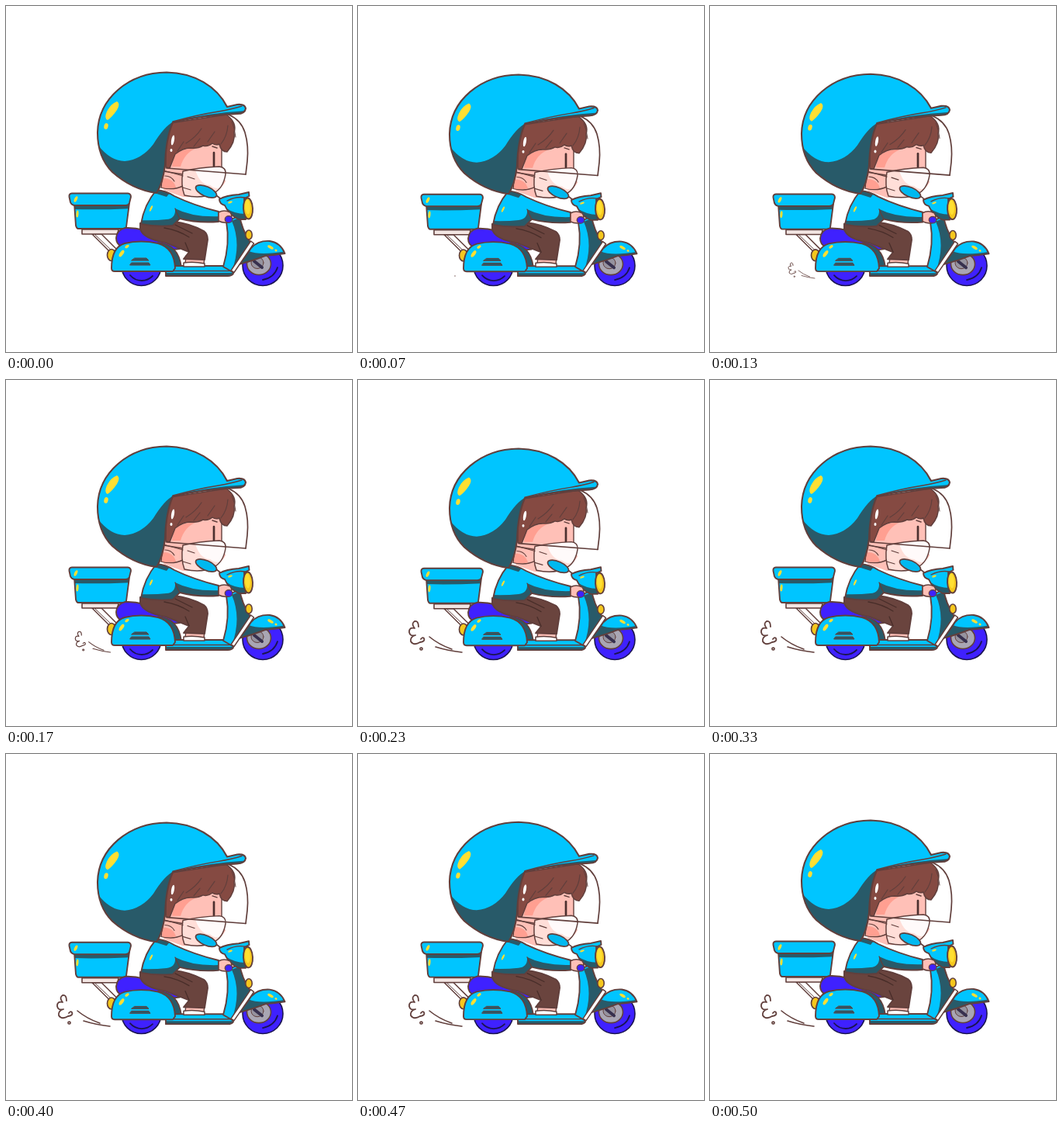
Write an HTML page with a canvas that moves like this. It is 446 px wide and 446 px high and loops after 530 ms.

```html
<!DOCTYPE html>
<html>
<head>
<meta charset="utf-8">
<style>
html, body { margin: 0; width: 446px; height: 446px; overflow: hidden; background: #fff; }
canvas { display: block; }
</style>
</head>
<body>
<canvas id="stage" width="446" height="446"></canvas>
<script>
const ctx = document.getElementById('stage').getContext('2d');
const LOOP = 530, GROUND = 360;
const LINE = '#613f3c', BLUE = '#00c5ff', TEAL = '#285a69', TIRE = '#1b1450';
const VIOLET = '#3f21ff', YELLOW = '#ffdf32', AMBER = '#f5c71d';
const HAIR = '#854a42', PANTS = '#6a443e';
const SKIN = '#ffc0b7', BLUSH = '#ff9f91', WHITE = '#fff';

function shape(d, fill, width = 1.9, color = LINE) {
  const path = new Path2D(d);
  if (fill) { ctx.fillStyle = fill; ctx.fill(path); }
  if (width) { ctx.lineWidth = width; ctx.strokeStyle = color; ctx.stroke(path); }
}

const line = (d, width = 1.4, color = LINE) => shape(d, null, width, color);

function oval(x, y, rx, ry, fill, angle = 0, width = 0, color = LINE) {
  ctx.beginPath();
  ctx.ellipse(x, y, rx, ry, angle * Math.PI / 180, 0, Math.PI * 2);
  if (fill) { ctx.fillStyle = fill; ctx.fill(); }
  if (width) { ctx.lineWidth = width; ctx.strokeStyle = color; ctx.stroke(); }
}

// Fills an outline, paints details clipped to it, then strokes it.
function shaded(d, fill, details, width = 1.9) {
  shape(d, fill, 0);
  ctx.save();
  ctx.clip(new Path2D(d));
  details();
  ctx.restore();
  line(d, width);
}

function drawBox() {
  shape('M111 294L135 318L143 314L123 294Z', WHITE, 1.5);
  line('M115 295L138 317', 1);
  shape('M98 288H145L144 294H98Z', '#f3e6e3', 1.6);
  shaded('M88 254H159L155 285Q154 287 151 287H93Q91 287 90 283Z', BLUE, () => {
    shape('M84 254H162V261Q120 263 86 262Z', TEAL, 0);
  });
  oval(92, 268, 1.5, 4.5, YELLOW, 5);
  shape('M85 241.5H157Q161 242 161 246L159 254Q158 257 154 257H88Q84 256 83 253L81.5 246Q81 242 85 241.5Z', BLUE);
  oval(90, 249, 1.8, 4, YELLOW, 25);
}

function drawWheels() {
  oval(174.5, 335, 25.5, 25.5, VIOLET, 0, 1.6, TIRE);
  line('M160 347Q166 354 175 354Q183 354 189 348', 1.8, TIRE);
  oval(331, 334.5, 26, 26, VIOLET, 0, 1.6, TIRE);
  oval(326, 332.5, 15.5, 14, '#a9a6b3', 0, 1.6);
  oval(324, 331, 8, 7.5, '#96939f', 0, 1);
  line('M320 329L330 337', 4, '#37304e');
  line('M331 353Q346 350 350 337', 1.8, TIRE);
}

function drawRear() {
  shape('M142 299Q143 288 154 286Q176 285 200 298L224 313L198 316L149 310Q142 307 142 299Z', VIOLET);
  oval(136, 321, 5.5, 7.5, AMBER, 0, 1.7);
  shape('M196 305Q222 307 226 336L212 342Z', TEAL, 1.7);
  shaded('M206 335H291L293 345Q291 348 286 348H206Z', BLUE, () => {
    shape('M200 344H296V350H200Z', TEAL, 0);
    line('M206 341.5H294', 1.4);
  });
  shape('M136 338Q136 311 153 306Q174 301 196 306Q217 312 218 338L215 342H140Q136 342 136 338Z', BLUE);
  shape('M166 325H181L184 328H162Z', TEAL, 1);
  shape('M162 331H184L186 334H160Z', TEAL, 1);
  oval(149, 319, 2.2, 5, YELLOW, 35);
  oval(156, 310, 1.7, 3, YELLOW, 55);
}

function drawFront() {
  shaded('M284 278L301 270Q304 288 314 303L318 306L292 343L280 336Q289 306 284 278Z', BLUE, () => {
    shape('M291 277L303 272L319 306L291 342Q304 307 291 277Z', TEAL, 0);
  });
  oval(313, 295, 4.2, 6, AMBER, 0, 1.6);
  shaded('M300 333Q307 326 316 312Q325 302 340 303Q354 305 359.5 319Q346 321 334 322Q319 328 300 333Z', BLUE, () => {
    shape('M298 335L313 316Q327 322 362 316V335H298Z', TEAL, 0);
  });
  oval(341, 311, 4.2, 1.8, YELLOW, 30);
  oval(348, 315, 1.6, 1.3, YELLOW, 30);
  shape('M315.5 303L319.5 306L294 343.5L290 341Z', WHITE, 1.5);
  line('M271 244Q278 249 286 258', 1.6);
  shaded('M275 249Q284 244 300 243L313 240L313.5 245L307 248L309 275L300 275Q287 269 282 257Q275 255 275 249Z', BLUE, () => {
    shape('M283 260Q294 268 309 268V278H285Z', TEAL, 0);
  });
  line('M285 251Q297 245 308 247', 1.3);
  oval(312, 261, 6, 13.5, AMBER, -3, 1.9);
  oval(311.5, 259, 3.3, 9.5, YELLOW, -3);
  oval(289, 253, 3, 1.2, YELLOW, -20);
}

function drawRider() {
  shape('M232 322H256L255 333H231Z', SKIN, 1.4);
  shape('M229 331Q242 329 256 332L256 336H229Z', WHITE, 1.5);
  shape('M173 280L216 278Q236 280 255 290Q260 294 260 301L256 327L229 326L236 317L206 305Q176 300 173 287Z', PANTS);
  line('M204 286Q222 289 236 298M218 282L240 293M236 317L231 305', 1.3, '#482d29');
  shaded('M194 237Q206 238 217 245Q242 257 274 265L274 278Q246 280 224 274L215 283Q194 285 174 281Q178 256 194 237Z', BLUE, () => {
    shape('M170 276Q190 277 207 275Q219 274 218 261Q241 273 278 271V282H222L216 288H170Z', TEAL, 0);
    shape('M194 236L211 241L207 246L191 241Z', TEAL, 0);
  });
  line('M218 261Q221 269 224 274', 1.3);
  oval(187, 261, 1.2, 4, YELLOW, 25);
  shape('M274 266Q281 262 289 266Q294 272 286 279Q279 280 274 277Z', SKIN, 1.5);
  oval(287, 275, 4.8, 4.3, VIOLET, 0, 1.2);
}

function drawFace() {
  shape('M213 150L284 141L278 185V210L283 226Q274 242 255 246L228 246L203 237L204 200Z', SKIN, 0);
  line('M278 184V210', 1.4);
  shape('M216 192Q229 183 246 183Q230 189 225 207H214Z', BLUSH, 0);
  shape('M203 213L228 217V232Q216 238 200 234Z', SKIN, 1.5);
  shape('M202 222Q216 222 219 234Q210 236 201 234Z', BLUSH, 0);
  line('M205 219Q213 219 217 226', 1.1);

  shape('M212 151L284 140Q298 150 294 163Q296 175 285 188Q277 188 275 178Q270 180 266 177Q260 182 254 180Q247 184 238 183Q228 183 218 191L211 209L206 208Q205 174 212 151Z', HAIR, 1.5);
  line('M232 177Q245 169 252 158M277 178Q285 168 286 154M260 175L269 162M221 187L229 175M242 181L250 171', 1.2);
  line('M268 189V208', 2.7, '#4c302f');
  line('M266 181L272 183', 1.5);

  shaded('M228 213Q249 208 275 207Q284 208 283 217Q280 235 268 241Q253 249 230 244Q225 231 228 213Z', '#ffded8', () => {
    shape('M243 207H288V226Q275 241 263 231Q248 230 243 207Z', '#fffafa', 0);
  }, 1.5);
  line('M203 212L228 219M228 234L238 237M234 220L243 223', 1.2);
  oval(258, 239, 14.5, 6.2, '#00b9f0', 24, 1.7);

  line('M287 140Q303 147 308 163Q313 180 311 200L309 217', 1.7);
  line('M309 217Q259 213 207 209', 1.7);
  line('M291 149Q295 158 296 169', 1);
  oval(215, 173, 1.9, 6.5, WHITE, 10);
  oval(213, 186, 1.5, 2, WHITE);
}

function drawHelmet() {
  const dome = 'M285 130L298 127Q308 126 309 132Q308 139 298 139Q254 141 215 150Q206 171 205 205Q202 229 194 241Q163 237 137 214Q118 195 118 163C119 119 158 86 207 85.5C243 86 272 104 285 130Z';
  shaded(dome, BLUE, () => {
    shape('M114 173Q132 200 153 200Q175 198 190 178Q204 155 216 149Q258 138 309 135V143L216 151V246H114Z', TEAL, 0);
  }, 2.1);
  line('M215 149Q248 140 274 136Q291 133 304 129', 1.4);
  shape('M143 123Q148 126 143 134Q137 143 131 147Q126 145 130 136Q135 126 143 123Z', YELLOW, 0);
  oval(129, 155, 2.6, 4, YELLOW, 15);
}

function drawDust(grow) {
  if (grow <= 0) return;
  if (grow < 0.2) {
    oval(125, 348, 0.7, 0.7, LINE);
    return;
  }
  ctx.save();
  ctx.translate(136, 351);
  ctx.scale(grow, grow);
  ctx.translate(-136, -351);
  line('M78 318Q78 310 73 311Q68 314 73 320Q66 318 66 325Q67 331 74 329Q67 331 68 337Q72 343 80 338Q87 337 85 333Q83 331 81 334', 1.8);
  oval(81.5, 346.5, 1.6, 1.4, null, 0, 1.6);
  line('M92 331Q104 341 121 347M100 344Q116 349 134 351', 1.6);
  ctx.restore();
}

// Suspension dip: sinks over three steps, springs back over two.
function dip(step) {
  const phase = step % 5;
  const amount = phase <= 3 ? phase / 3 : (5 - phase) / 2;
  return 4.4 * amount;
}

function draw(time) {
  const t = Math.floor(time % LOOP / 10) * 10;
  const step = Math.floor(t * 0.03 + 0.15);
  ctx.fillStyle = WHITE;
  ctx.fillRect(0, 0, 446, 446);
  ctx.lineJoin = ctx.lineCap = 'round';

  drawDust(Math.min(1, (step - 1) / 6));
  ctx.save();
  ctx.translate(0, GROUND);
  ctx.scale(1, 1 - dip(step) / 275);
  ctx.translate(0, -GROUND);
  drawBox();
  drawWheels();
  drawRear();
  drawFront();
  drawRider();
  drawFace();
  drawHelmet();
  ctx.restore();
}

const start = performance.now();
function tick() {
  draw(performance.now() - start);
  requestAnimationFrame(tick);
}
tick();
</script>
</body>
</html>
```
